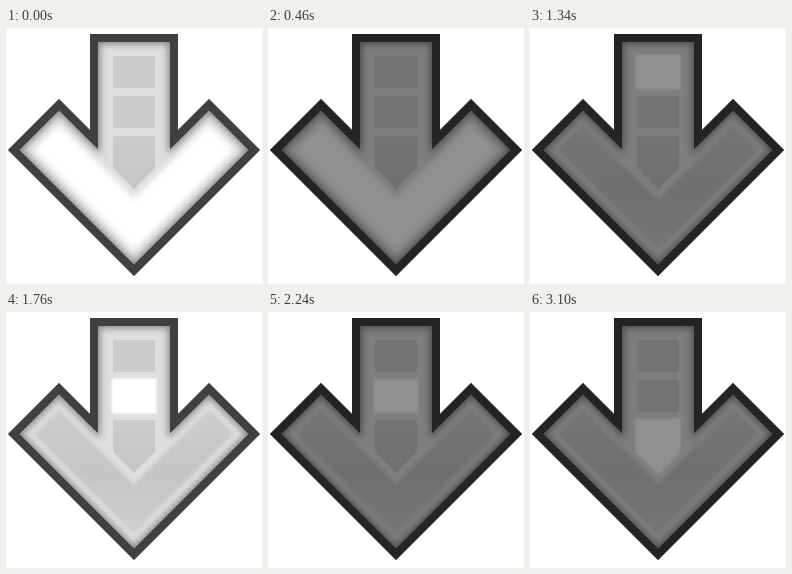
Animation of 256 by 256 pixels, one loop 3520 ms. Source, as an HTML page with a canvas:

```html
<!DOCTYPE html>
<html lang="en">
<head>
<meta charset="utf-8">
<title>Down arrow</title>
<style>
html, body { margin: 0; width: 100%; height: 100%; overflow: hidden; background: #fff; }
canvas { display: block; width: 256px; height: 256px; }
</style>
</head>
<body>
<canvas id="stage" width="256" height="256"></canvas>
<script>
const ctx = document.getElementById('stage').getContext('2d');
const PHASE = 880, HOLD = 120, STEPS = 9, DIM = 0.435;
const FADES = [340, 340, 360, 340];

function polygon(points) {
  const path = new Path2D();
  points.forEach(([x, y]) => path.lineTo(x, y));
  path.closePath();
  return path;
}

// V shape inset by d from the arrow head's outline
function chevron(d) {
  const k = d * Math.SQRT2, top = 71 + k;
  return polygon([
    [2 + k, 122], [53, top], [128, 146 + k], [203, top],
    [254 - k, 122], [128, 248 - k]
  ]);
}

function block(y, h, grow) {
  const l = 107 - grow, r = 149 + grow;
  return polygon([[l, y - grow], [r, y - grow], [r, y + h + grow], [l, y + h + grow]]);
}

function pointer(grow) {
  const l = 107 - grow, r = 149 + grow, top = 108 - grow;
  return polygon([[l, top], [r, top], [r, 140], [128, 161 + grow], [l, 140]]);
}

const arrow = polygon([
  [84, 6], [172, 6], [172, 102], [203, 71], [254, 122],
  [128, 248], [2, 122], [53, 71], [84, 102]
]);

const parts = [
  { off: chevron(18.5), on: chevron(17.5), soft: 1.6, glow: 3.5 },
  { off: block(28, 32, 0), on: block(28, 32, 1.5), soft: 0.7, glow: 1.2 },
  { off: block(68, 32, 0), on: block(68, 32, 1.5), soft: 0.7, glow: 1.2 },
  { off: pointer(0), on: pointer(1.5), soft: 0.7, glow: 1.2 }
];

const grey = ctx.createLinearGradient(0, 20, 0, 222);
grey.addColorStop(0, '#cccccc');
grey.addColorStop(0.4, '#cdcdcd');
grey.addColorStop(0.7, '#c5c5c5');
grey.addColorStop(1, '#cecece');

function soften(radius, paint) {
  ctx.filter = `blur(${radius}px)`;
  paint();
  ctx.filter = 'none';
}

function edge(width, color) {
  ctx.lineWidth = width;
  ctx.strokeStyle = color;
  ctx.stroke(arrow);
}

function drawArrow(lit) {
  ctx.save();
  ctx.clip(arrow);
  ctx.fillStyle = '#dedede';
  ctx.fillRect(0, 0, 256, 256);
  soften(3.5, () => edge(20, '#858585'));
  parts.forEach((part, i) => {
    const on = i === lit;
    ctx.fillStyle = on ? '#fff' : grey;
    soften(on ? part.glow : part.soft, () => ctx.fill(on ? part.on : part.off));
  });
  edge(16, '#404040');
  ctx.restore();
}

function draw(time) {
  const t = time % (PHASE * FADES.length);
  const lit = Math.floor(t / PHASE);
  const since = t - lit * PHASE - HOLD;
  const stepTime = FADES[lit] / (STEPS - 1);
  const step = since < 0 ? 0 : Math.min(STEPS, Math.floor(since / stepTime + 1e-6) + 1);

  ctx.fillStyle = '#fff';
  ctx.fillRect(0, 0, 256, 256);
  drawArrow(lit);
  ctx.fillStyle = `rgba(0, 0, 0, ${DIM * step / STEPS})`;
  ctx.fill(arrow);
}

const start = performance.now();
function frame() {
  draw(performance.now() - start);
  requestAnimationFrame(frame);
}
frame();
</script>
</body>
</html>
```
